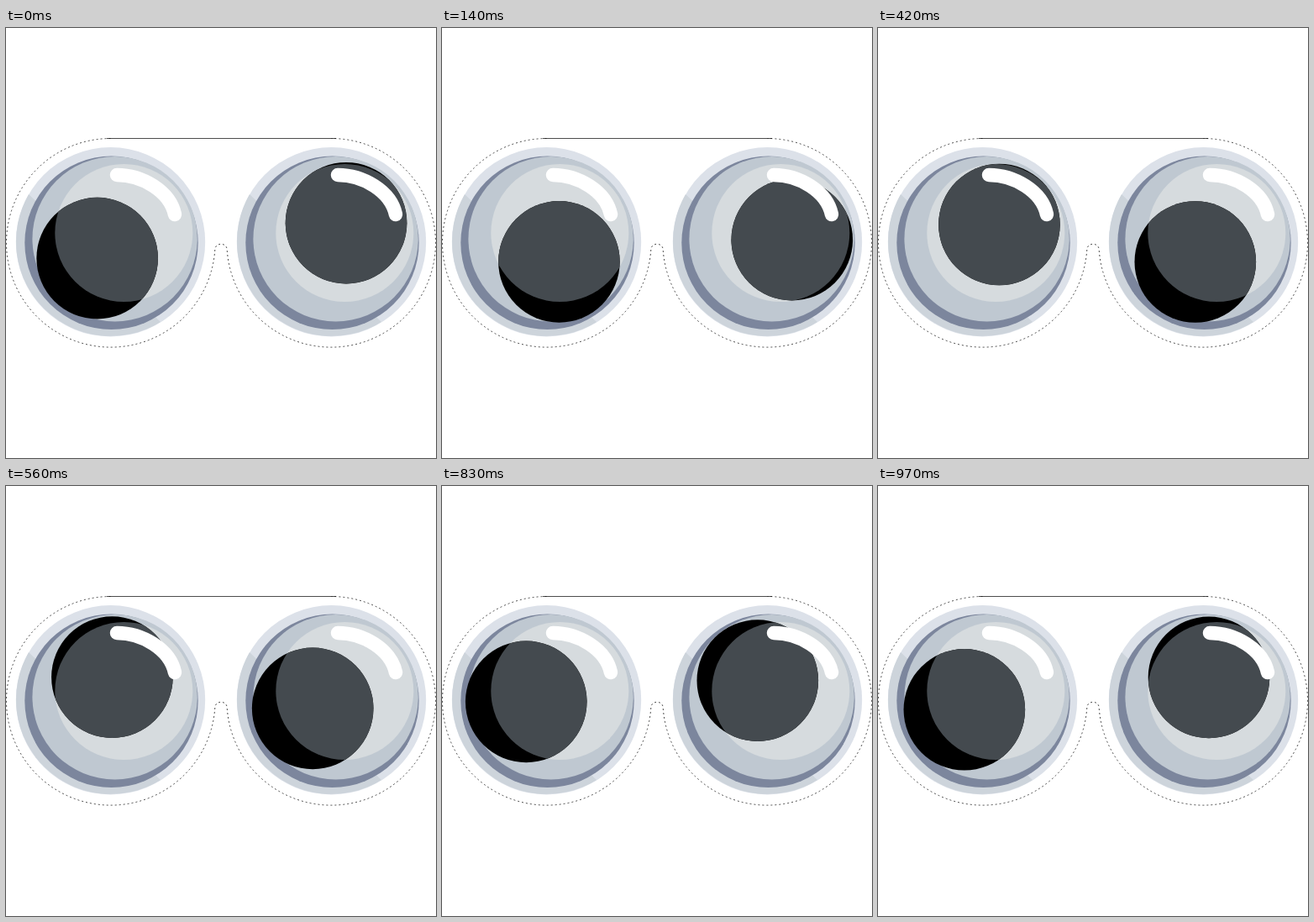
An HTML page for the animation above (1.11 s loop, 512 px wide and 512 px high).

```html
<!DOCTYPE html>
<html lang="en">
<head>
<meta charset="utf-8">
<title>Googly eyes</title>
<style>
  html, body { margin: 0; width: 100%; height: 100%; overflow: hidden; background: #fff; }
  svg { display: block; width: 100vw; height: 100vh; }
</style>
</head>
<body>
<svg viewBox="0 0 512 512">
  <defs>
    <clipPath id="lens"><circle cx="140.3" cy="244" r="82"/></clipPath>
    <g id="base">
      <circle cx="124.5" cy="254.8" r="112.7" fill="#dce1e9"/>
      <path d="M27 198A112.7 112.7 0 0 0 184 350Z" fill="#cdd4db"/>
      <circle cx="125.5" cy="255.8" r="103.2" fill="#7c869d"/>
      <circle cx="129.6" cy="251.2" r="98.2" fill="#bfc8d1"/>
      <circle cx="140.3" cy="244" r="82" fill="#d6dbde"/>
    </g>
    <path id="shine" d="M132 175C162 175 195 194 201 222" fill="none" stroke="#fff" stroke-width="16.5" stroke-linecap="round"/>
  </defs>

  <g fill="none" stroke="#000" stroke-width=".7">
    <path d="M120 131.5H393"/>
    <path stroke-dasharray="2 3" d="M124.5 131.5A124.3 124.3 0 1 0 248.8 264C249 255 263 255 263.2 264A124.3 124.3 0 1 0 387.5 131.5"/>
  </g>

  <g class="eye">
    <use href="#base"/>
    <circle class="pupil" r="72.3"/>
    <g clip-path="url(#lens)"><circle class="pupil" r="72.3" fill="#444a4f"/></g>
    <use href="#shine"/>
  </g>
</svg>
<script>
  const LOOP = 1110, POSES = 8;
  const ORBIT = { x: 127, y: 254.5, r: 26.9 };
  // [pose, degrees]: each pupil rolls once around its eye, at a changing speed
  const rolls = [
    [[0, 133], [2, -8], [5, -133], [6, -185], [8, -227]],
    [[0, -56], [1, -5], [3, 117], [7, 278.5], [8, 304]]
  ];

  const left = document.querySelector('.eye');
  const right = left.cloneNode(true);
  right.setAttribute('transform', 'translate(263)');
  left.after(right);
  const eyes = [left, right].map(eye => eye.querySelectorAll('.pupil'));

  // Equal steps, rounded to hundredths of a second
  const startOf = pose => Math.round(pose * LOOP / POSES / 10) * 10;

  function angleAt(keys, pose) {
    const next = keys.findIndex(([p]) => p > pose);
    const [p0, a0] = keys[next - 1], [p1, a1] = keys[next];
    return (a0 + (a1 - a0) * (pose - p0) / (p1 - p0)) * Math.PI / 180;
  }

  function draw(time) {
    const t = time % LOOP;
    let pose = 0;
    while (startOf(pose + 1) <= t) pose++;
    eyes.forEach((pupils, i) => {
      const angle = angleAt(rolls[i], pose);
      for (const pupil of pupils) {
        pupil.setAttribute('cx', ORBIT.x + ORBIT.r * Math.cos(angle));
        pupil.setAttribute('cy', ORBIT.y + ORBIT.r * Math.sin(angle));
      }
    });
  }

  const begin = performance.now();
  function tick() {
    draw(performance.now() - begin);
    requestAnimationFrame(tick);
  }
  tick();
</script>
</body>
</html>
```
